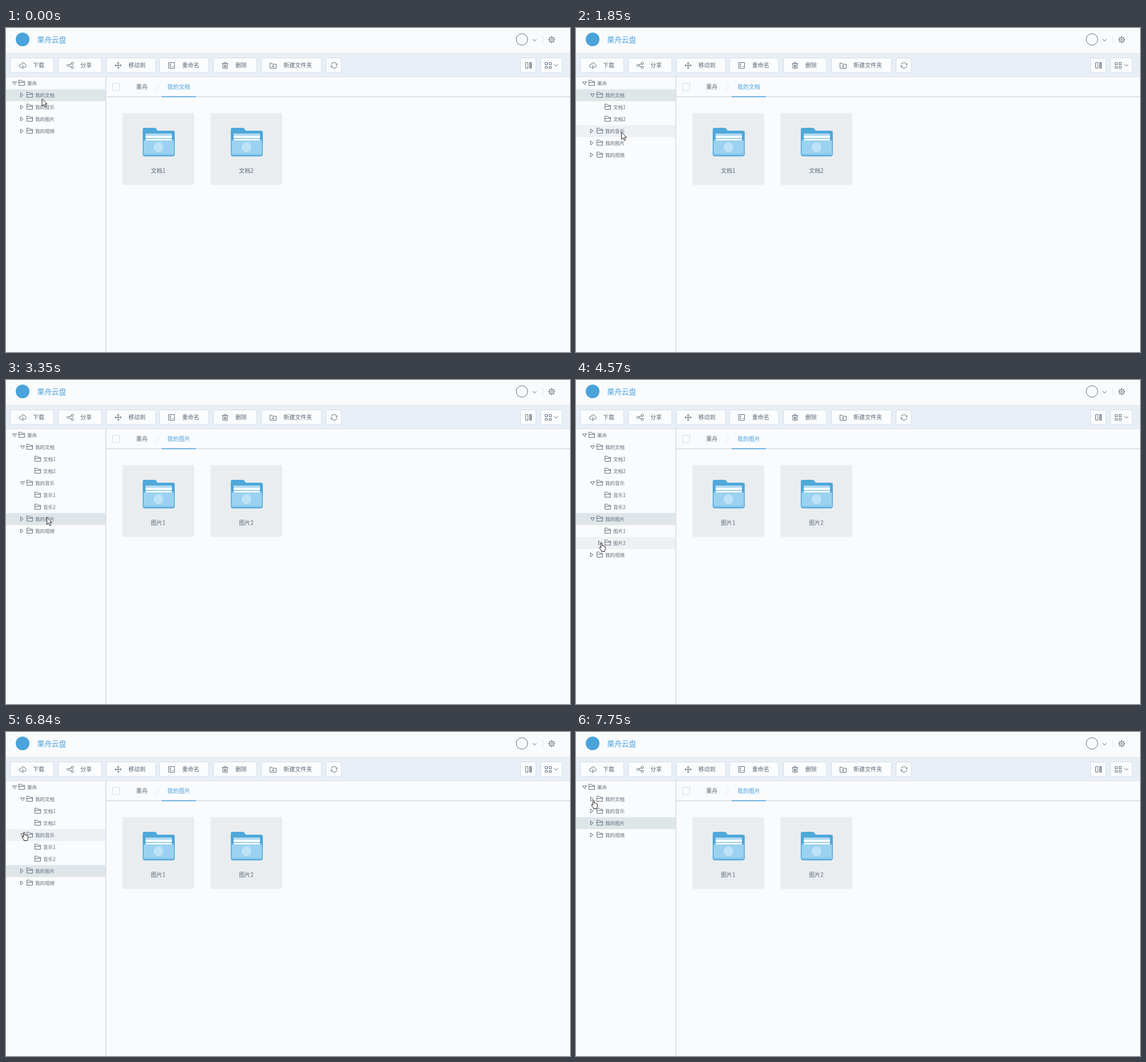
Animation of 986 by 568 pixels, one loop 8000 ms. Source, as an HTML page:

```html
<!DOCTYPE html>
<html lang="zh">
<head>
<meta charset="utf-8">
<style>
  html, body { margin: 0; width: 100%; height: 100%; overflow: hidden; background: #fafbfd; }
  svg { display: block; width: 986px; height: 568px; }
  text { font: 10px "Noto Sans CJK SC", "Noto Sans CJK", sans-serif; fill: #5d6b77; }
  .blue { fill: #4aa3da; }
  .title { font-size: 12.7px; }
  #tree text { font-size: 8.5px; }
  .icon { fill: none; stroke: #62717d; stroke-width: 1; }
  .btn { fill: #fafcfe; stroke: #d3dce4; }
  .mid { text-anchor: middle; }
</style>
</head>
<body>
<svg viewBox="0 0 986 568">
  <defs>
    <path id="folder" class="icon" d="M.5 9.5V.5H4.5L6 2.5H10.5V9.5ZM.5 4.5H10.5"/>
    <g id="bigFolder">
      <path fill="#4fa8da" d="M0 46V3Q0 0 3 0H20Q23 0 24 2L26 5H53Q56 5 56 8V46Q56 50 52 50H4Q0 50 0 46Z"/>
      <path fill="#b3daf1" d="M5 10H51V15H5Z"/>
      <path fill="#fff" d="M5 14H51V18H5ZM5 19H51V22H5Z"/>
      <path fill="#9bd2f1" d="M1.5 22H54.5V46Q54.5 48 52 48H4Q1.5 48 1.5 46Z"/>
      <path fill="#8bc8ec" d="M1.5 45H54.5V46Q54.5 48 52 48H4Q1.5 48 1.5 46Z"/>
      <circle cx="27.5" cy="34" r="8.5" fill="#c0e2f6"/>
    </g>
    <path id="arrow" fill="#fff" stroke="#222" d="M.5 .8V13.2L3.4 10.5L5.4 15.2L7.6 14.3L5.6 9.7H9.5Z"/>
    <path id="hand" fill="#fff" stroke="#222" d="M3.5 9.5V2Q3.5 .5 4.7 .5T5.9 2V6Q6 5 7 5.2T8.2 6.3Q9.6 5.6 10 7Q11.5 6.6 11.5 8V10.5Q11.5 12 10.3 13.5V15.5H4.3V13.8L.9 9.6Q.3 8.4 1.4 8T3.5 9.5Z"/>
  </defs>

  <rect width="986" height="568" fill="#fafbfd"/>
  <rect y="44" width="986" height="42" fill="#e9eff6"/>
  <path d="M0 44.5H986M0 85.5H986" stroke="#d9e1e8"/>

  <circle cx="29" cy="20" r="12" fill="#4aa3da"/>
  <text class="blue title" x="54.5" y="25">栗舟云盘</text>
  <ellipse class="icon" cx="902" cy="20" rx="10" ry="10"/>
  <path class="icon" d="M920.5 19.5L924 23L927.5 19.5"/>
  <path d="M938.5 12V28" stroke="#e1e6eb"/>
  <g class="icon" transform="translate(954 20.5)">
    <circle r="4"/><circle r="1.5"/>
    <path stroke-width="1.6" d="M0-4V-6M0 4V6M-4 0H-6M4 0H6M-3-3L-4.2-4.2M3 3L4.2 4.2M-3 3L-4.2 4.2M3-3L4.2-4.2"/>
  </g>

  <g id="bar"></g>

  <path d="M176 120.5H986" stroke="#cfdae2" stroke-width="1.4"/>
  <path d="M272 120.5H332" stroke="#4aa3da" stroke-width="1.5"/>
  <rect x="186.5" y="97.5" width="12" height="12" fill="#fcfdfe" stroke="#d3dce4"/>
  <text x="227.5" y="106.5">栗舟</text>
  <path d="M262 96.5L267 103L262 109.5" fill="none" stroke="#dfe5ea"/>
  <text id="crumb" class="blue" x="282" y="106.5"></text>
  <g id="cards"></g>

  <g id="tree"></g>
  <path d="M174.5 86V568" stroke="#cfdbe3" stroke-width="1.4"/>
  <use id="cursor"/>
</svg>
<script>
const $ = id => document.getElementById(id);

// x, width, icon path (relative to x, y 52), label, label x
const buttons = [
  [8, 76, "M19 17H17.5Q15 16.5 15.5 14T18 12Q19 9 22 9T25.5 12Q28 13 27 15.5Q26.5 17 24 17M21.5 12.5V19M19 16.5L21.5 19L24 16.5", "下载", 47],
  [92, 76, "M18.5 13.5A2 2 0 1 1 14.5 13.5A2 2 0 1 1 18.5 13.5M26 10A2 2 0 1 1 22 10A2 2 0 1 1 26 10M26 17A2 2 0 1 1 22 17A2 2 0 1 1 26 17M18.4 12.7L22.2 10.8M18.4 14.3L22.2 16.2", "分享", 130],
  [176, 86, "M14.5 13.5H25.5M20 8V19M18 10L20 8L22 10M18 17L20 19L22 17M16.5 11.5L14.5 13.5L16.5 15.5M23.5 11.5L25.5 13.5L23.5 15.5", "移动到", 214],
  [269, 86, "M15.5 8.5H25.5V18.5H15.5ZM18.5 11V16M17.5 11H19.5M17.5 16H19.5M21 15.5H22M23 15.5H24", "重命名", 308],
  [363, 76, "M14.5 10.5H25.5M18 10V8.5H22V10M16 11V18.5H24V11M18.5 12.5V17M20 12.5V17M21.5 12.5V17", "删除", 401],
  [447, 105, "M14.5 18.5V9.5H18L19.5 11.5H25.5V18.5ZM20 13V17M18 15H22", "新建文件夹", 485],
  [560, 27, "M8.5 12.5A5 5 0 0 1 18 11.5L18.5 12.5M18.5 14.5A5 5 0 0 1 9 15.5L8.5 14.5M16.5 12.5H18.7V10M10.5 14.5H8.3V17", "", 0],
  [900, 27, "M8.5 8.5H12.5V18.5H8.5ZM15.5 8.5H18.5V18.5H15.5ZM17 9V18", "", 0],
  [935, 38, "M7.5 8.5H11.5V12.5H7.5ZM14.5 8.5H18.5V12.5H14.5ZM7.5 15.5H11.5V18.5H7.5ZM14.5 15.5H18.5V18.5H14.5ZM23.5 11.5L27 15L30.5 11.5", "", 0]
];
$("bar").innerHTML = buttons.map(([x, w, icon, label, tx]) =>
  `<rect class="btn" x="${x - .5}" y="52.5" width="${w}" height="25.5" rx="2"/>
   <path class="icon" transform="translate(${x} 52)" d="${icon}"/>
   <text x="${tx}" y="69">${label}</text>`).join("");

const kinds = ["文档", "音乐", "图片", "视频"];
const openSpan = { 文档: [670, 7630], 音乐: [2150, 6990], 图片: [3480, 6310], 图片2: [4850, 5380] };
const isOpen = (name, t) => name in openSpan && t >= openSpan[name][0] && t < openSpan[name][1];

// first step, last step, step count, x, y, ends as a hand
const moves = [
  [120, 120, 1, 56, 121], [270, 270, 1, 49, 121], [420, 420, 1, 71, 119],
  [1090, 1700, 6, 79, 182], [2860, 3350, 5, 71, 240],
  [3910, 4270, 4, 45, 287, 1], [4420, 4420, 1, 42, 287, 1], [4570, 4570, 1, 40, 285, 1],
  [5100, 5100, 1, 39, 285, 1], [5520, 5520, 1, 39, 283, 1], [5670, 5670, 1, 36.5, 259],
  [5790, 6040, 3, 28, 243, 1], [6450, 6690, 3, 26, 172, 1], [6840, 6840, 1, 27, 175, 1],
  [7110, 7360, 3, 26, 121, 1], [7750, 7750, 1, 26, 119, 1]
];

function cursorAt(t) {
  let x = 62.5, y = 123.5, hand = false;
  for (const [start, end, n, toX, toY, endsHand] of moves) {
    if (t < start) break;
    const gap = (end - start) / (n - 1) || 1;
    const step = Math.min(n, 1 + Math.floor((t - start) / gap + .001));
    x += (toX - x) * step / n;
    y += (toY - y) * step / n;
    hand = step === n && !!endsHand;
  }
  return { x, y, hand };
}

function treeRows(t) {
  const rows = [{ label: "栗舟", level: 0, mark: "open" }];
  const add = (label, level, key, parent) =>
    rows.push({ label, level, key, mark: parent && (isOpen(key, t) ? "open" : "shut") });
  for (const kind of kinds) {
    add("我的" + kind, 1, kind, true);
    if (!isOpen(kind, t)) continue;
    for (const n of [1, 2]) {
      const name = kind + n;
      add(name, 2, name, name === "图片2");
      if (isOpen(name, t)) [1, 2].forEach(i => add(`${name}-${i}`, 3));
    }
  }
  return rows;
}

function rowSvg(row, i, selected, hovered) {
  const top = 86 + 21 * i, x = 14 * row.level;
  const fill = row.key === selected ? "#dfe6ea" : i === hovered ? "#eef1f4" : "none";
  const mark = row.mark === "open" ? "M11.5 8.5H18.5L15 13.5Z" : "M11.5 7L16 10.5L11.5 14Z";
  return `<rect y="${top}" width="174" height="21" fill="${fill}" transform="translate(0 .3)"/>
    <g transform="translate(${x} ${top})">
      ${row.mark ? `<path class="icon" d="${mark}"/>` : ""}
      <use href="#folder" x="22" y="5"/>
      <text x="37" y="14.3">${row.label}</text>
    </g>`;
}

function setHtml(id, html) {
  const el = $(id);
  if (el.last !== html) el.innerHTML = el.last = html;
}

function draw(now) {
  const t = now % 8000;
  const selected = t < 2000 ? "文档" : t < 3350 ? "音乐" : "图片";
  const { x, y, hand } = cursorAt(t);
  const hovered = t < 7630 ? Math.floor((y - 86) / 21) : -1;
  setHtml("tree", treeRows(t).map((row, i) => rowSvg(row, i, selected, hovered)).join(""));
  setHtml("crumb", "我的" + selected);
  setHtml("cards", [1, 2].map(n =>
    `<g transform="translate(${49.5 + 154 * n} 149)">
      <rect width="125.5" height="126" rx="3" fill="#eaedf0"/>
      <use href="#bigFolder" x="35.5" y="26"/>
      <text class="mid" x="62.5" y="105">${selected}${n}</text>
    </g>`).join(""));
  $("cursor").setAttribute("href", hand ? "#hand" : "#arrow");
  $("cursor").setAttribute("transform", `translate(${x} ${y})`);
  requestAnimationFrame(draw);
}
draw(performance.now());
</script>
</body>
</html>
```
